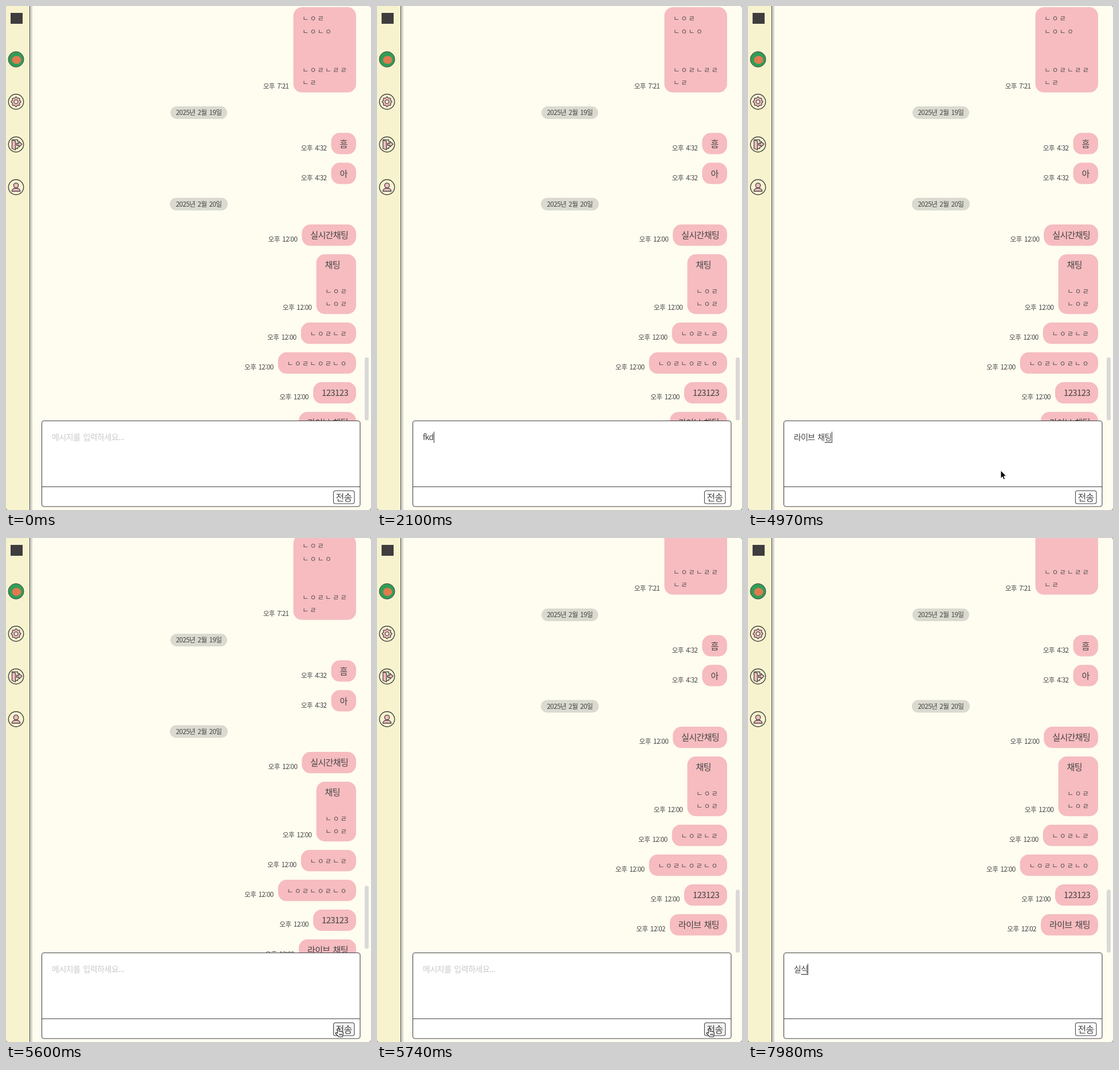
Recreate the animation shown at these times as an HTML page. Size 637 by 879 pixels, loop 8000 ms.

```html
<!DOCTYPE html>
<html lang="ko">
<head>
<meta charset="utf-8">
<title>Chat</title>
<style>
  html, body { margin: 0; width: 100%; height: 100%; overflow: hidden; background: #fffdf0; }
  svg { display: block; }
  text {
    font-family: "Noto Sans CJK KR", "Noto Sans CJK JP", "Noto Sans", sans-serif;
    font-size: 15px; letter-spacing: -.65px; word-spacing: 1.5px; fill: #444;
  }
  .jamo { font-size: 11.5px; letter-spacing: 2.7px; }
  .small { font-size: 11.7px; letter-spacing: -.6px; }
  .field { font-size: 14px; letter-spacing: -.7px; }
  .hint { fill: #c9c9c9; letter-spacing: -.5px; }
  .send { font-size: 16px; }
  .line { fill: none; stroke: #444; stroke-width: 1.4; stroke-linejoin: round; }
  .pink { fill: #f6bcc0; stroke: #444; stroke-width: 1.3; stroke-linejoin: round; }
</style>
</head>
<body>
<svg width="637" height="879" viewBox="0 0 637 879">
  <rect width="637" height="879" fill="#fffdf0"/>

  <g id="list"></g>
  <rect id="thumb" x="626" width="7" height="110" rx="3.5" fill="#d9d9d9"/>

  <rect width="41" height="879" fill="#f8f3cf"/>
  <rect x="41" width="1.2" height="879" fill="#444"/>
  <rect x="43" width="3" height="879" fill="#d6d6d0"/>

  <rect x="8" y="12" width="21" height="19" fill="#3f3d3d"/>
  <g transform="translate(17.5 93)">
    <circle r="13.5" fill="#319d56" stroke="#444"/>
    <ellipse cx="1" cy="1" rx="8" ry="7" fill="#e07a50"/>
  </g>
  <g transform="translate(17.5 167)">
    <circle class="line" r="13.2"/>
    <path id="gear" class="pink"/>
    <circle r="3.3" fill="#f8f3cf" stroke="#444" stroke-width="1.3"/>
  </g>
  <g transform="translate(17.5 241.5)">
    <circle class="line" r="13.2"/>
    <path class="line" d="M-7 -8H3V-4M3 4V7H-1"/>
    <path class="pink" d="M-7 -8L-1 -5.5V9.5L-7 7Z"/>
    <path class="pink" d="M1 -2H5V-5.5L10.5 -.5L5 4.5V1.5H1Z"/>
  </g>
  <g transform="translate(17.5 316)">
    <circle class="line" r="13.2"/>
    <path class="pink" d="M-7.3 7C-7.3 0 7.3 0 7.3 7Z"/>
    <circle class="pink" cy="-3" r="4.2"/>
  </g>

  <rect x="62.5" y="723.5" width="555.5" height="149.5" rx="4" fill="#fff" stroke="#444" stroke-width="1.1"/>
  <path d="M62.5 838.5H618" stroke="#444" stroke-width="1.1"/>
  <rect id="button" x="571.5" y="845.5" width="36.5" height="22.5" rx="3.5" stroke="#444" stroke-width="1.1"/>
  <text class="send" x="575.5" y="862.5">전송</text>

  <text id="hint" class="field hint" x="80" y="757">메시지를 입력하세요...</text>
  <rect id="mark" x="80" y="742" height="22" fill="#b3d4fc"/>
  <text id="typed" class="field" x="80" y="757"></text>
  <rect id="under" y="760.5" height="1.3" fill="#444"/>
  <rect id="caret" y="742.5" width="1" height="19.5" fill="#333"/>

  <path id="arrow" d="M0 0V13.8L3.1 10.9L5.1 15.8L7.5 14.8L5.5 10H9.7Z" fill="#000" stroke="#fff" stroke-width="1"/>
  <path id="beam" d="M-3 -8Q0 -8 0 -6Q0 -8 3 -8M0 -6V6M-3 8Q0 8 0 6Q0 8 3 8" fill="none" stroke="#333"/>
  <path id="hand" fill="#fff" stroke="#222" stroke-width="1.1" stroke-linejoin="round"
    d="M-1.5 7V1Q-1.5 -.5 -.2 -.5T1.2 1V5Q2 4 3.5 5Q5 4.6 6 5.7Q8 5.4 8.3 7.2V10Q8 12.5 7 14.5H.5Q-1 12 -4.5 9.2Q-5.3 7.5 -3.7 7Q-2.5 7 -1.5 8.5ZM2 9V12M4 9V12M6 9V12"/>

  <path d="M0 874V879H5Q0 879 0 874ZM637 874V879H632Q637 879 637 874ZM637 4V0H633Q637 0 637 4Z" fill="#999"/>
</svg>
<script>
const LOOP = 8000, STEP = 70, LINE = 22.3;
const $ = id => document.getElementById(id);

function add(tag, attrs, label) {
  const el = document.createElementNS('http://www.w3.org/2000/svg', tag);
  for (const key in attrs) el.setAttribute(key, attrs[key]);
  if (label) el.textContent = label;
  $('list').append(el);
}

function bubble(x, y, time, ...lines) {
  const height = lines.length * LINE + 15;
  add('rect', { x, y, width: 611 - x, height, rx: 15, fill: '#f6bcc0' });
  lines.forEach((line, i) => {
    const jamo = /^[ㄱ-ㅎ]/.test(line);
    add('text', { x: x + (jamo ? 16 : 15), y: y + 24.4 + i * LINE, class: jamo ? 'jamo' : '' }, line);
  });
  add('text', { x: x - 8, y: y + height - 7, class: 'small', 'text-anchor': 'end' }, '오후 ' + time);
}

function day(y, width, label) {
  add('rect', { x: 336.5 - width / 2, y, width, height: 22, rx: 11, fill: '#dadad0' });
  add('text', { x: 336.5, y: y + 15.2, class: 'small', 'text-anchor': 'middle' }, label);
}

bubble(501.5, 2, '7:21', 'ㄴㅇㄹ', 'ㄴㅇㄴㅇ', '', '', 'ㄴㅇㄹㄴㄹㄹ', 'ㄴㄹ');
day(175, 99, '2025년 2월 19일');
bubble(567.5, 221.3, '4:32', '흠');
bubble(567.5, 273.3, '4:32', '아');
day(334.5, 101, '2025년 2월 20일');
bubble(516.3, 381, '12:00', '실시간채팅');
bubble(541.5, 433, '12:00', '채팅', '', 'ㄴㅇㄹ', 'ㄴㅇㄹ');
bubble(514.7, 552, '12:00', 'ㄴㅇㄹㄴㄹ');
bubble(474.7, 604, '12:00', 'ㄴㅇㄹㄴㅇㄹㄴㅇ');
bubble(536, 656, '12:00', '123123');
bubble(511, 708, '12:02', '라이브 채팅');

const petals = Array.from({ length: 97 }, (_, i) => {
  const a = i / 96 * Math.PI * 2, r = 7.6 + .9 * Math.cos(8 * a);
  return (r * Math.cos(a)).toFixed(2) + ' ' + (r * Math.sin(a)).toFixed(2);
});
$('gear').setAttribute('d', 'M' + petals.join('L') + 'Z');

// time, text, flags: c caret, u composing underline, s selected
const typing = [
  [0, '', ''], [1190, '', 'c'], [1750, '', ''],
  [1890, 'f', 'c'], [1960, 'fk', 'c'], [2100, 'fkd', 'c'], [2240, 'fkdlq', 'c'],
  [2380, 'fkdlqm', 'c'], [2870, 'fkdlqm', ''], [3080, 'fkdlqm', 's'], [3500, '', 'c'],
  [3640, 'ㄹ', 'cu'], [3780, '라', 'cu'], [3850, '랑', 'cu'], [3990, '라이', 'cu'],
  [4130, '라이브', 'cu'], [4200, '라이브 ', 'c'], [4340, '라이브 ㅊ', 'cu'],
  [4410, '라이브 채', 'cu'], [4480, '라이브 챝', 'cu'], [4620, '라이브 채티', 'cu'],
  [4690, '라이브 채팅', 'cu'], [5600, '', ''],
  [6930, '', 'c'], [7420, '', ''], [7490, 'ㅅ', 'cu'], [7630, '시', 'cu'],
  [7770, '실', 'cu'], [7840, '실시', 'cu'], [7980, '실식', 'cu']
];

const scrolling = [[0, 0], [5600, 8], [5670, 28.7], [5740, 52]];

// time, shape, x, y
const pointer = [
  [0, ''], [210, 'beam', 361, 786], [1190, 'beam', 355, 777], [1890, ''],
  [4970, 'arrow', 441, 810], [5390, 'hand', 580, 855.5],
  [5950, 'arrow', 560, 845], [6020, 'arrow', 535, 821], [6090, 'arrow', 524, 810],
  [6790, 'arrow', 511.7, 805], [6860, 'beam', 507, 785], [6930, 'beam', 506, 768], [7420, '']
];

const at = (rows, t) => rows.findLast(row => row[0] <= t);
const show = (id, on) => { $(id).style.display = on ? '' : 'none'; };

function drawField(t) {
  const [, text, flags] = at(typing, t);
  const el = $('typed');
  const measure = s => {
    el.textContent = s.replace(/ /g, '\u00a0');
    return s ? el.getComputedTextLength() : 0;
  };
  const start = measure(text.slice(0, -1)), end = measure(text);
  show('hint', !text);
  show('mark', flags.includes('s'));
  show('under', flags.includes('u'));
  show('caret', flags.includes('c'));
  $('mark').setAttribute('width', end);
  $('under').setAttribute('x', 80.5 + start);
  $('under').setAttribute('width', Math.max(0, end - start - .5));
  $('caret').setAttribute('x', Math.round(80 + end));
}

function drawPointer(t) {
  let [, shape, x, y] = at(pointer, t);
  if (t >= 4970 && t < 5390) {
    const p = (Math.floor(t / STEP) * STEP - 4970) / 420;
    const ease = p * p * (3 - 2 * p);
    x += 139 * ease;
    y += 45.5 * ease;
  }
  for (const id of ['arrow', 'beam', 'hand']) show(id, id === shape);
  if (shape) $(shape).setAttribute('transform', `translate(${x} ${y})`);
  $('button').setAttribute('fill', shape === 'hand' ? '#f2f2f2' : '#fff');
}

function draw(t) {
  const offset = at(scrolling, t)[1];
  $('list').setAttribute('transform', `translate(0 ${-offset})`);
  $('thumb').setAttribute('y', t < 5600 ? 612.7 : 605.3 + offset * 8 / 52);
  drawField(t);
  drawPointer(t);
}

const began = performance.now();
function tick() {
  draw((performance.now() - began) % LOOP);
  requestAnimationFrame(tick);
}
tick();
</script>
</body>
</html>
```
